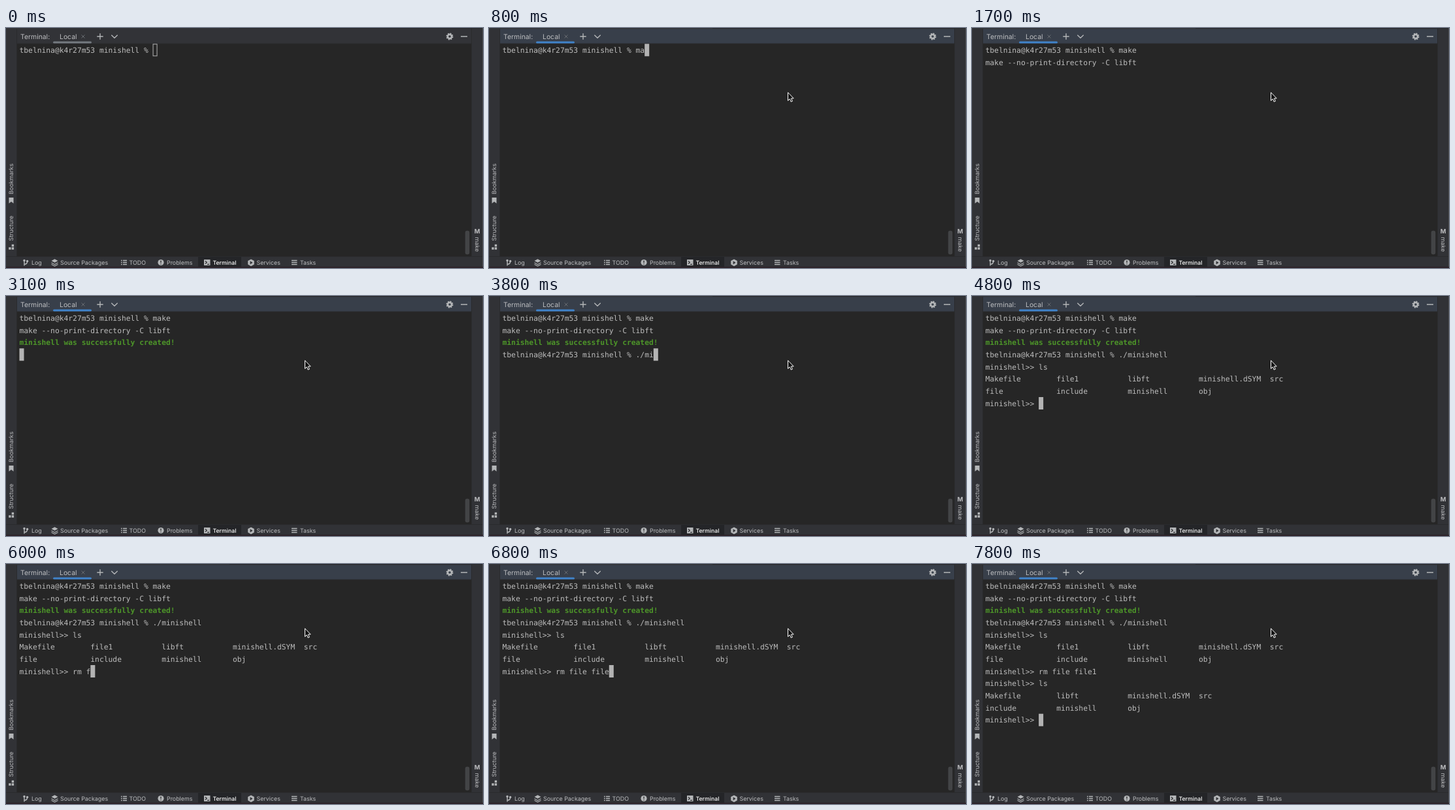
Recreate the animation shown at these times as an HTML page. Size 730 by 368 pixels, loop 8 s.

```html
<!DOCTYPE html>
<html lang="en">
<head>
<meta charset="utf-8">
<title>Terminal session</title>
<style>
html, body { margin: 0; height: 100%; overflow: hidden; background: #262626; }
svg { display: block; text-rendering: geometricPrecision; }
.ui { font: 8.9px Inter, "Open Sans", sans-serif; fill: #bdbec0; }
.head { font-size: 10.4px; }
.term text { font: 11.3px "DejaVu Sans Mono", monospace; fill: #bcbcbc; white-space: pre; }
.term .ok { font-weight: bold; fill: #4d9529; }
.line { fill: none; stroke: #b4b6b8; stroke-width: 1.4; }
.icon { fill: #b4b6b8; }
</style>
</head>
<body>
<svg width="730" height="368" viewBox="0 0 730 368">
  <rect width="730" height="368" fill="#313236"/>
  <rect x="17" y="24" width="695" height="326" fill="#262626"/>
  <rect id="header" x="17" y="1.5" width="695" height="22.5"/>
  <path d="M342 .5H730" stroke="#26272a"/>
  <path d="M16.5 1V350M712.5 1V350M0 350.5H730M17 24H712" stroke="#2a2b2d" fill="none"/>
  <path d="M729.5 0V366" stroke="#48494c"/>
  <rect y="366" width="730" height="2" fill="#2c2229"/>
  <rect x="294" y="351" width="66" height="15" fill="#242528"/>
  <rect x="702.7" y="310.7" width="6.6" height="36.6" rx="3" fill="#434446"/>

  <g class="ui head">
    <text x="22" y="16.8">Terminal:</text>
    <text x="82" y="16.8">Local</text>
  </g>
  <rect id="tab" x="72" y="20.4" width="59" height="3" rx="1.5"/>
  <path d="M115.5 10.5l5 5m0-5l-5 5" stroke="#686c71" fill="none"/>
  <path class="line" d="M139.3 13h9.4M144 8.3v9.4M161.3 10.8l4.7 4.4 4.7-4.4M696 13h10"/>
  <g class="line">
    <circle cx="679" cy="13" r="3.1" stroke-width="2.6"/>
    <circle cx="679" cy="13" r="4.5" stroke-width="1.9" stroke-dasharray="1.9 1.634"/>
  </g>

  <g class="ui">
    <text x="39" y="362.8">Log</text>
    <text x="83" y="362.8">Source Packages</text>
    <text x="188.5" y="362.8">TODO</text>
    <text x="246" y="362.8">Problems</text>
    <text x="316.5" y="362.8" fill="#fff" font-weight="500" style="font-size:8.7px">Terminal</text>
    <text x="383.5" y="362.8">Services</text>
    <text x="450" y="362.8">Tasks</text>
    <text transform="translate(11.2 255) rotate(-90)">Bookmarks</text>
    <text transform="translate(11.2 326.5) rotate(-90)">Structure</text>
    <text transform="translate(718.4 320.5) rotate(90)">make</text>
    <text x="721" y="314.6" font-weight="bold" style="font-size:9.4px" text-anchor="middle">M</text>
  </g>

  <g class="icon">
    <circle cx="28" cy="356.5" r="1.7"/>
    <circle cx="32.6" cy="357.5" r="1.7"/>
    <path d="M69.5 357l5-2.7 5 2.7-5 2.7zM69.5 359.3l5 2.6 5-2.6v1.3l-5 2.6-5-2.6zM69.5 361.8l5 2.6 5-2.6v1.3l-5 2.6-5-2.6z"/>
    <circle cx="237" cy="359.5" r="4.6"/>
    <rect x="303" y="355" width="9.5" height="9"/>
    <path d="M375 354.4l4.8 2.7v5.4l-4.8 2.7-4.8-2.7v-5.4z"/>
    <path d="M4.5 260h7v9l-3.5-2.8-3.5 2.8z"/>
    <path d="M8.7 331.8h3.4v3.4h-3.4zM4.2 336.3h3.4v3.4H4.2zM8.7 336.3h3.4v3.4h-3.4z"/>
  </g>
  <path class="line" d="M28 357v7.5M28 362.3q4.6 0 4.6-4.5M179 356.5h6M179 359.5h6M179 362.5h6M176 356.5h1.7M176 359.5h1.7M176 362.5h1.7M437 356.5h8.5M437 359.5h8.5M437 362.5h8.5"/>
  <path d="M237 356.5v3.6M237 361.2v1.4M305 357.2l2.2 2.2-2.2 2.2M308 362.3h3" stroke="#2b2c2f" stroke-width="1.3" fill="none"/>
  <path d="M373.6 357.2l3.9 2.6-3.9 2.6z" fill="#313236"/>

  <g class="term" id="term"></g>
  <rect id="caret"/>
  <path id="pointer" d="M0 0v12.6l2.8-2.7 1.9 4.4 2.1-.9-1.8-4.3h3.7z" fill="#111" stroke="#fff" stroke-linejoin="round"/>
</svg>
<script>
const $ = id => document.getElementById(id);
const LOOP = 8000, LEFT = 20.5, TOP = 24.3, ROW = 18.67, COL = 6.803, ROWS = 12;
const HIDDEN = 0, SOLID = 1, HOLLOW = 2;
const prompt = 'tbelnina@k4r27m53 minishell % ', mini = 'minishell>> ';
const table = rows => rows.map(r => r.map(c => c.padEnd(16)).join('').trimEnd() + '\n').join('');

// [time, text added to the screen, caret]
const events = [[0, prompt, HOLLOW]];
const add = (t, text = '', caret = SOLID) => events.push([t, text, caret]);
const type = (t, parts) => parts.forEach((p, i) => add(t + i * 100, p));

add(400);
type(700, [...'make']);
add(1200, '\nmake --no-print-directory -C libft\n');
for (const t of [1700, 2200, 2700]) {
  add(t, '', HIDDEN);
  add(t + 300);
}
add(3100, 'minishell was successfully created!\n');
add(3200, prompt);
add(3400, '', HIDDEN);
type(3600, ['.', '/m', 'i', 'n', 'is', 'he', 'll', '\n' + mini]);
type(4600, [...'ls']);
add(4800, '\n' + table([
  ['Makefile', 'file1', 'libft', 'minishell.dSYM', 'src'],
  ['file', 'include', 'minishell', 'obj']
]) + mini);
add(5000, '', HIDDEN);
type(5300, ['', ...'rm ']);
add(5800, '', HIDDEN);
type(6000, [...'file ']);
type(6600, ['f', 'il', 'e']);
type(7000, ['1', '\n', mini]);
type(7400, [...'ls']);
add(7700, '\n' + table([
  ['Makefile', 'libft', 'minishell.dSYM', 'src'],
  ['include', 'minishell', 'obj']
]) + mini);

const set = (el, attrs) => {
  for (const k in attrs) el.setAttribute(k, attrs[k]);
};
const rows = Array.from({ length: ROWS }, (_, i) => {
  const el = document.createElementNS($('term').namespaceURI, 'text');
  set(el, { x: LEFT, y: TOP + 13.8 + i * ROW });
  return $('term').appendChild(el);
});

function drawCaret(mode, col, row) {
  const hollow = mode === HOLLOW, inset = hollow ? 0.5 : 0;
  set($('caret'), {
    x: LEFT + col * COL + inset, y: TOP + row * ROW + inset,
    width: 7 - inset * 2, height: 19 - inset * 2,
    fill: hollow ? 'none' : '#b3b3b3', stroke: hollow ? '#b3b3b3' : 'none',
    visibility: mode === HIDDEN ? 'hidden' : 'visible'
  });
}

function draw(t) {
  const past = events.filter(e => e[0] <= t);
  const lines = past.map(e => e[1]).join('').split('\n');
  rows.forEach((el, i) => {
    const s = lines[i] || '';
    if (el.textContent !== s) el.textContent = s;
    set(el, { class: s.startsWith('minishell was') ? 'ok' : '' });
  });
  drawCaret(past.at(-1)[2], lines.at(-1).length, lines.length - 1);

  const focused = t >= 400;
  set($('header'), { fill: focused ? '#383f4a' : '#323337' });
  set($('tab'), { fill: focused ? '#4083c9' : '#747a80' });

  const left = (1 - Math.min(1, Math.max(0, (t - 100) / 200))) ** 2;
  set($('pointer'), {
    transform: `translate(${457.5 + 239 * left} ${98.8 + 25 * left})`,
    visibility: t < 100 ? 'hidden' : 'visible'
  });
}

// The screen refreshes ten times a second.
const start = performance.now();
function tick() {
  const t = (performance.now() - start) % LOOP;
  draw(Math.floor(t / 100) * 100);
  requestAnimationFrame(tick);
}
tick();
</script>
</body>
</html>
```
